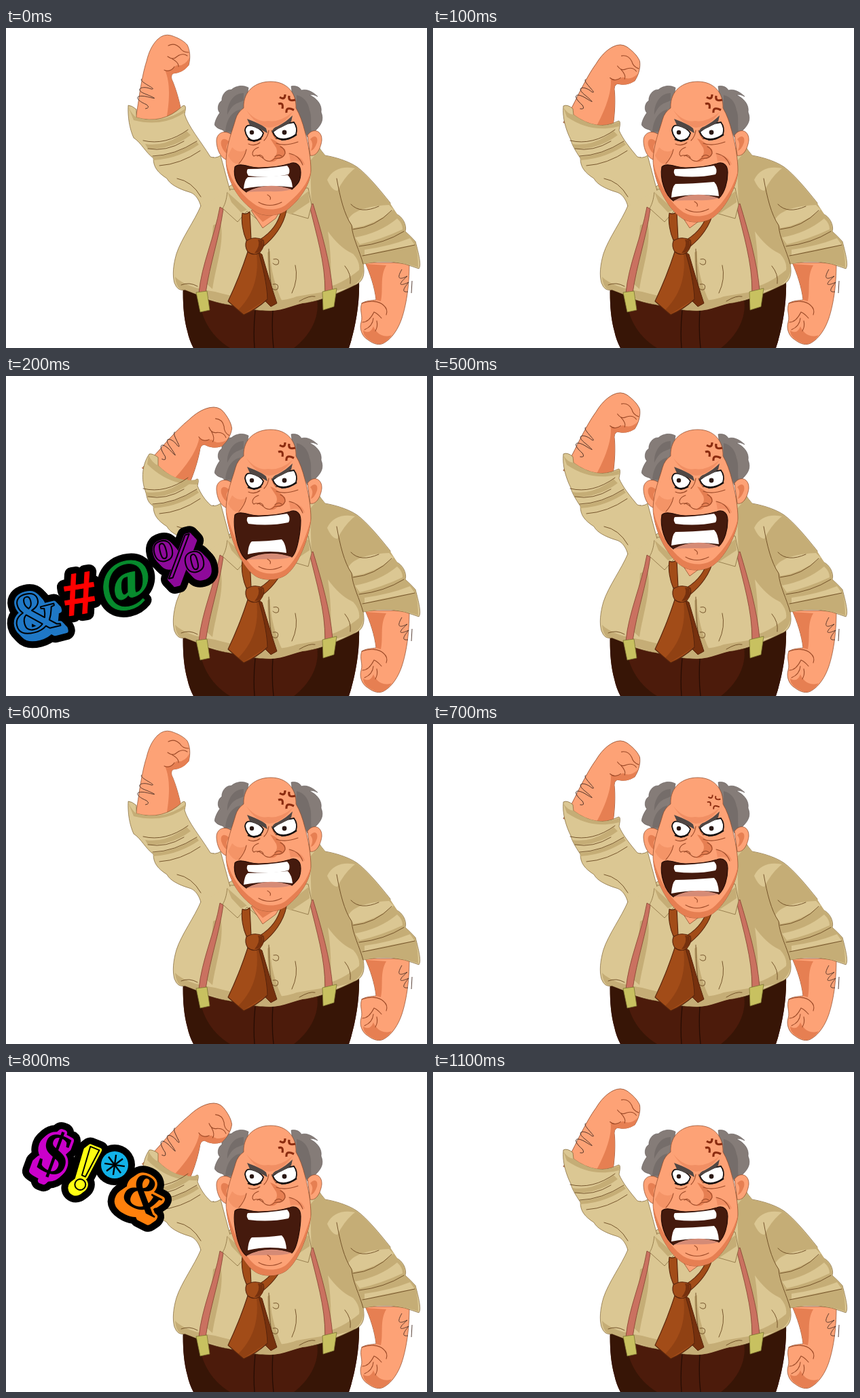
These frames come from a looping animation (620 by 472 pixels, 1.2 s). An HTML page:

```html
<!DOCTYPE html>
<html lang="en">
<head>
<meta charset="utf-8">
<title>Angry man</title>
<style>
  html, body { margin: 0; width: 100%; height: 100%; overflow: hidden; background: #fff; }
  svg { display: block; width: 100%; height: 100%; }
  .ln { fill: none; stroke: #6b4a22; stroke-width: .9; stroke-linecap: round; stroke-linejoin: round; }
  .skin { fill: #fda276; stroke: #8a4526; stroke-width: .7; }
  .tan { fill: #e67f52; }
  .crease { fill: none; stroke: #9c4a28; stroke-width: 1.1; stroke-linecap: round; }
  .fuzz { fill: none; stroke: #4a3026; stroke-width: .9; }
  .cloth { fill: #dbc793; stroke: #7d6234; stroke-width: .7; stroke-linejoin: round; }
  .lit { fill: #dbc793; }
  .fold { fill: #c5ad76; }
  .hair { fill: #857c78; stroke: #5d5552; stroke-width: .6; }
  .lock { fill: #6c6461; opacity: .6; }
  .tooth { fill: #fff; }
  .strap { fill: #ca7160; stroke: #83402f; stroke-width: .8; }
  .clip { fill: #c8c160; stroke: #7b7432; stroke-width: .8; }
  .tie { fill: #a24c18; stroke: #59250c; stroke-width: 1.1; stroke-linejoin: round; }
  .dark { fill: #76310e; }
</style>
</head>
<body>
<svg viewBox="0 0 620 472" preserveAspectRatio="none">
  <g id="trousers">
    <path fill="#4c1b0b" d="M261 374 C260 400 261 425 267 447 Q270 461 276 472 H505 C514 445 521 408 520 374Z"/>
    <path fill="#371506" d="M261 374 C260 400 261 425 267 447 Q270 461 276 472 H330 C298 452 286 424 283 390Z M458 400 C462 425 450 452 424 472 H505 C514 445 521 408 520 374Z"/>
    <path fill="none" stroke="#260d04" stroke-width="1.3" d="M367 416 Q364 446 366 472 M393 416 Q391 447 394 472"/>
  </g>

  <g id="lowArm">
    <path class="skin" d="M529 346 C536 362 543 382 545 401 C538 402 530 402 524 406 C520 417 526 424 523 434 C520 443 524 455 533 460 C542 467 550 468 556 465 C569 458 578 443 583 428 C589 410 594 382 594 346Z"/>
    <path class="tan" d="M530 348 C537 363 544 384 545 401 L552 403 C556 386 550 367 560 350Z"/>
    <path class="tan" d="M526 446 C526 456 535 461 544 465 C553 469 562 462 568 453 C555 458 545 450 541 440 C537 451 530 449 526 446Z"/>
    <path class="crease" d="M524 406 C535 402 549 402 556 409 Q563 415 560 423 M525 434 C533 434 538 427 542 419 Q547 421 553 428 M528 445 Q540 440 541 428 M544 447 Q548 440 546 432"/>
    <path class="fuzz" d="M583 356 C576 368 577 373 591 366 C577 378 578 382 593 375 C584 386 583 390 592 389 M598 373 L597 391"/>
  </g>

  <g id="shirt">
    <path class="cloth" d="M287 262 C278 284 258 311 251 333 C246 350 245 365 248 376 Q253 389 263 386 C274 390 287 395 299 401 Q318 407 329 408 C349 414 372 417 389 417 C407 416 425 406 443 405 C464 402 492 390 512 380 C526 375 529 364 526 348 Q567 338 608 355 C612 350 608 334 603 315 Q596 307 588 300 C591 290 583 278 576 275 C568 266 565 263 566 258 C550 238 532 216 517 205 C502 195 482 190 470 188 Q464 181 461 176 L430 180 L326 235 L305 190"/>
    <path class="fold" d="M448 196 L462 178 Q466 184 471 189 C488 191 503 197 517 206 C534 219 550 240 566 259 L577 276 Q589 285 588 300 L603 316 Q607 335 607 353 Q567 339 526 348 C528 364 523 375 505 383 L468 392 C471 355 463 318 450 270Z"/>
    <path class="lit" d="M473 224 C480 208 497 203 514 207 Q500 217 488 240 Q480 240 473 224Z M504 282 C512 268 538 262 564 261 L571 268 C552 283 533 292 512 295Z M514 309 Q551 302 576 281 Q584 288 584 297 Q552 312 521 319Z M528 327 Q565 322 595 310 L602 320 Q566 325 528 335Z M474 300 Q492 325 511 333 Q522 345 520 357 C505 369 492 377 478 381 Q480 340 474 300Z"/>
    <path class="fold" d="M249 367 C262 380 286 386 308 389 C352 401 394 409 428 396 L470 389 L480 394 L443 405 C425 407 410 417 389 417 C345 414 315 405 294 398 L264 386 Q251 388 249 367Z"/>
    <path class="fold" d="M305 291 C303 323 299 346 294 376 L304 385 C310 347 322 316 316 286Z M385 331 C385 358 387 382 400 406 L408 406 C397 384 389 355 389 329Z"/>
    <path class="ln" d="M487 222 C492 250 498 275 509 291 C510 309 521 329 526 348 M511 297 Q544 294 568 269 M520 322 Q557 318 586 300 M525 336 Q562 329 602 320 M508 260 Q522 275 549 263 M387 326 Q387 367 395 408 M426 350 Q431 370 421 391 M499 351 Q509 363 507 377 M258 379 Q270 374 282 381 M432 403 Q447 394 455 396"/>
    <path class="ln" d="M394 341 Q404 339 401 348 Q397 351 393 347 M393 378 Q403 376 400 385 Q396 388 392 384"/>
  </g>

  <g id="braces">
    <path class="strap" d="M315 264 L320 267 C314 310 300 348 294 391 L284 391 C288 348 307 309 315 264Z"/>
    <path class="strap" d="M447 262 L452 259 C464 299 478 347 481 388 L470 389 C470 345 457 305 447 262Z"/>
    <path class="clip" d="M280 390 L296 388 L300 416 L286 419Z M466 389 L487 384 L483 411 L467 416Z"/>
  </g>

  <g id="collar">
    <path class="cloth" d="M326 238 C326 248 323 260 319 266 L341 286 L355 270 L372 284 L407 270 L445 281 L450 261 L445 236Z"/>
    <path class="skin" d="M361 269 L378 295 L397 281 L407 265Z"/>
    <path class="tan" d="M362 269 L378 286 L403 270Z"/>
    <path class="fold" d="M326 242 L332 257 L346 272 L355 268Z M408 270 L446 240 L447 257 L420 275Z"/>
  </g>

  <g id="tie">
    <path class="tie" d="M348 273 Q354 276 359 271 L361 312 L354 313 C349 302 346 286 348 273Z M405 270 L413 269 C409 292 393 311 379 322 L374 312 C390 302 401 288 405 270Z"/>
    <path class="dark" stroke="#59250c" d="M371 330 L377 334 C384 358 391 382 399 406 L390 411 L381 402 C379 375 375 354 371 330Z"/>
    <path class="tie" d="M356 330 C347 358 337 382 327 403 Q339 414 350 423 Q369 415 385 400 C384 374 378 351 372 331Z"/>
    <path class="dark" d="M369 333 C372 360 368 390 342 416 L350 422 L384 400 C383 374 378 351 372 332Z" opacity=".4"/>
    <path class="tie" d="M354 314 Q366 306 379 313 Q382 321 374 331 Q365 337 356 330 Q351 322 354 314Z"/>
    <path class="dark" d="M371 312 Q375 321 366 332 Q375 332 379 322 L378 313Z"/>
  </g>

  <g id="hair">
    <path class="hair" d="M357 88 C348 83 337 86 332 91 C323 90 317 101 318 107 C311 111 311 122 315 125 C309 133 306 143 308 144 C313 151 320 148 322 154 L337 157 C345 136 350 126 353 114Z"/>
    <path class="hair" d="M420 86 C430 84 434 90 435 92 C443 89 453 95 459 101 Q452 97 447 99 C457 103 466 113 464 124 C469 136 463 144 457 150 L444 161 C438 151 431 130 424 116Z"/>
    <path class="lock" d="M350 96 C333 96 325 114 326 128 C334 111 339 112 350 107Z M345 120 C330 124 324 139 323 153 L336 153Z M428 99 C438 101 445 109 447 121 C451 130 448 143 450 154 L443 158 L428 122Z"/>
  </g>

  <g id="ears">
    <path class="skin" d="M333 158 C323 149 309 154 310 168 C311 184 320 197 330 194Z"/>
    <path class="skin" d="M444 158 C453 146 466 152 465 166 C463 180 456 190 448 188Z"/>
    <path class="tan" d="M329 168 C321 160 315 164 317 173 Q320 183 328 187 Q321 174 329 168Z M448 164 C455 156 460 161 458 169 Q454 180 449 181 Q454 170 448 164Z"/>
  </g>

  <g id="jaw"></g>

  <g id="face">
    <path class="tan" d="M389 163 C399 166 405 174 411 179 C414 187 408 193 400 193 Q394 199 387 197 C397 191 401 185 398 177Z"/>
    <path class="tan" d="M333 176 C342 185 349 182 354 180 C348 190 350 196 343 201 Q333 201 327 188Z" opacity=".4"/>
    <path class="tan" d="M417 186 C428 187 438 192 440 202 Q429 193 419 197Z M354 121 Q369 140 386 137 Q403 140 422 124 Q408 145 387 147 Q367 143 354 121Z" opacity=".5"/>
    <path class="crease" d="M372 176 C363 179 361 186 365 189 C371 185 377 191 382 195 Q390 199 396 192 Q407 194 411 185 Q411 178 404 175 M370 189 Q375 185 379 191 M396 190 Q401 185 406 189 M354 179 Q352 190 343 200 M417 185 Q432 188 437 202 M357 171 Q366 175 374 169 M398 170 Q411 175 430 168 M387 151 Q386 160 380 166 M391 151 Q393 158 398 164"/>
    <g fill="#fff" stroke="#151010" stroke-width="1.8">
      <path d="M352 151 Q353 142 361 144 Q374 147 379 155 Q377 165 365 167 Q354 164 352 151Z"/>
      <path d="M393 153 Q407 141 424 139 Q430 147 427 157 Q418 165 406 165 Q396 162 393 153Z"/>
      <path fill="none" stroke-width="2.4" d="M356 164 Q366 169 376 163 M398 162 Q413 168 428 157"/>
    </g>
    <circle cx="362" cy="154" r="3.2" fill="#2a1712"/>
    <circle cx="410" cy="154" r="3.4" fill="#2a1712"/>
    <path fill="#504744" d="M355 134 C365 138 376 142 383 148 L385 155 C375 149 364 146 359 143Z M391 154 Q393 147 400 145 C409 140 416 135 422 129 L420 138 C412 145 400 148 391 154Z"/>
  </g>

  <path id="vein" fill="none" stroke="#8b2c10" d="M403 102 Q411 107 411 98 M417 100 Q415 109 426 106 M401 112 Q409 109 407 119 M413 125 Q412 115 424 121"/>
  <g id="arm"></g>
  <g id="words" text-anchor="middle"></g>
</svg>

<script>
const $ = id => document.getElementById(id);
const path = (cls, d) => `<path class="${cls}" d="${d}"/>`;

// chin: bottom of the face, lip: bottom of the mouth, teeth: left, right, top, bottom of the lower row
const poses = {
  up: {
    chin: 276, lip: 240, teeth: [350, 422, 219, 237], fist: "",
    sleeve: "M287 263 C284 252 278 244 270 242 C253 237 241 230 237 222 C223 213 217 205 217 192 C205 183 199 169 188 162 C182 149 179 131 180 114 Q185 114 192 120 L192 132 Q231 143 260 115 Q267 111 263 127 C268 145 287 167 301 190 Q309 193 316 188 L330 240",
    rim: "M180 116 Q186 128 192 132 Q231 143 264 119 L264 124 Q231 147 188 136Z"
  },
  mid: {
    chin: 286, lip: 253, teeth: [351, 421, 229, 250], fist: "translate(7 6) rotate(18 226 130)",
    sleeve: "M287 263 C284 252 278 244 270 242 C253 237 241 230 237 222 C223 213 217 205 217 192 C209 180 204 171 203 165 C196 151 190 132 192 115 Q198 112 206 119 L207 128 Q241 153 271 138 Q278 133 274 151 C279 163 290 177 301 190 Q309 193 316 188 L330 240",
    rim: "M192 117 Q198 127 207 128 Q241 153 275 138 L274 145 Q234 156 197 131Z"
  },
  down: {
    chin: 300, lip: 269, teeth: [356, 413, 243, 263], fist: "translate(15 13) rotate(33 226 130)",
    sleeve: "M287 263 C284 252 278 244 270 242 C253 237 241 230 237 222 C223 213 217 205 217 192 C206 185 208 176 205 169 C199 153 200 131 211 115 Q216 114 224 120 L224 132 Q249 158 278 154 Q286 147 282 162 C287 174 293 183 302 191 Q309 193 316 188 L330 240",
    rim: "M210 117 Q215 128 224 132 Q249 158 283 153 L282 160 Q240 162 208 130Z"
  }
};

const forearm =
  path("skin", "M188 146 C193 125 195 108 197 95 C200 77 203 61 207 49 C210 36 215 25 223 17 Q232 8 243 11 C252 14 261 18 267 25 C271 33 272 44 269 55 Q260 66 246 67 Q241 71 246 80 C253 98 258 117 262 146Z") +
  path("tan", "M234 62 C243 82 241 112 234 146 L262 146 C257 112 251 93 245 78 Q241 69 247 67 Q261 66 269 55 L270 44 Q263 57 251 55 Q242 64 234 62Z") +
  path("crease", "M239 26 Q248 21 256 29 Q260 36 269 36 M238 42 Q246 48 252 42 Q260 36 267 41 M244 45 Q255 51 254 57 M233 62 Q242 66 248 57") +
  path("fuzz", "M200 75 C194 79 225 91 214 90 C200 84 187 91 207 98 C226 106 219 104 206 101 C189 98 190 106 207 113 Q213 118 205 119");

const sleeveFolds =
  path("fold", "M205 171 Q235 176 266 152 L272 158 Q243 180 209 178Z M217 190 Q248 188 281 168 L284 172 Q253 193 217 195Z") +
  path("ln", "M202 166 Q235 174 268 150 M209 178 Q236 183 262 167 M216 189 Q248 188 281 167 M226 203 Q257 201 286 181 M252 222 Q274 226 287 249");

const armMarkup = p =>
  `<g transform="${p.fist}">${forearm}</g>` +
  path("cloth", p.sleeve) + path("fold", p.rim) + sleeveFolds;

function jawMarkup({ chin: k, lip: m, teeth: [l, r, t, b] }) {
  const edge = `449 210 C448 232 432 ${k - 22} 414 ${k - 8} C402 ${k + 2} 378 ${k + 3} 366 ${k - 6} C345 ${k - 20} 325 228 324 195`;
  return path("skin", `M350 118 C349 92 368 79 390 79 C414 79 428 96 427 118 C433 128 437 140 440 152 C446 173 449 195 ${edge} C325 170 334 150 338 135 Q341 124 350 118Z`) +
    path("tan", `M${edge} C329 226 350 ${k - 26} 369 ${k - 14} C384 ${k - 6} 401 ${k - 7} 412 ${k - 15} C430 ${k - 30} 444 232 449 210Z`) +
    `<path fill="#451a0d" stroke="#280d06" stroke-width="1.2" d="M337 205 C345 197 359 207 373 206 Q399 206 418 200 C429 196 434 204 434 213 C434 226 430 ${m - 10} 421 ${m - 2} C400 ${m - 10} 372 ${m - 9} 354 ${m + 2} C341 ${m - 7} 334 222 337 205Z"/>` +
    path("tooth", "M356 208 Q385 208 414 203 Q420 209 416 216 Q388 222 357 218 Q353 212 356 208Z") +
    path("tooth", `M${l} ${b} Q${l + 1} ${t + 5} ${l + 6} ${t + 1} Q${l + 29} ${t + 1} ${r - 7} ${t - 2} Q${r - 1} ${t + 4} ${r} ${b - 2} Q${(l + r) / 2} ${b - 7} ${l} ${b}Z`) +
    `<path fill="#d58b76" d="M354 ${m + 2} Q384 ${m - 14} 421 ${m - 2} Q404 ${m + 2} 390 ${m + 1} Q370 ${m + 1} 354 ${m + 2}Z"/>` +
    path("crease", `M372 ${k - 19} Q388 ${k - 10} 406 ${k - 19} M385 ${k - 30} Q391 ${k - 27} 389 ${k - 23}`);
}

const SERIF = "'Liberation Serif', serif", SANS = "'Liberation Sans', sans-serif";

// char, centre x, centre y, size, tilt, colour, baseline shift in em, depth, swell, face, font
const curses = [
  [
    ["&", 43, 348, 86, -14, "#1f78c6", .33, 10, 8, "line", SERIF],
    ["#", 108, 321, 88, -9, "#ff0000", .34, 0, 1, "", SANS],
    ["@", 177, 308, 83, -13, "#078a2d", .25, 0, 1, "", SERIF],
    ["%", 254, 266, 84, -14, "#8e0a9a", .33, 13, 5, "line", SERIF]
  ],
  [
    ["$", 72, 122, 88, 20, "#cb00cb", .32, -9, 9, "black", SERIF],
    ["!", 119, 142, 98, 22, "#ffff12", .33, -8, 7, "line", SERIF],
    ["*", 160, 137, 0, 0, "#12b2e8"],
    ["&", 205, 180, 76, 27, "#ff800c", .33, -11, 9, "black", SERIF]
  ]
];

function glyph([ch, x, y, size, tilt, color, shift, depth, swell, face, font], under) {
  if (!size) {
    if (under) return `<circle cx="${x}" cy="${y}" r="30"/>`;
    const spokes = [0, 45, 90, 135].map(a => `<path d="M-15 0H15" transform="rotate(${a + 8})"/>`).join("");
    return `<g transform="translate(${x} ${y})"><circle r="20" fill="${color}"/><g stroke="#000" stroke-width="2.4">${spokes}</g></g>`;
  }
  const text = (dx, dy, paint) => `<text x="${dx}" y="${size * shift + dy}" ${paint}>${ch.replace("&", "&amp;")}</text>`;
  const side = Math.sign(depth);
  let out = "";
  for (let i = Math.abs(depth); i >= 0; i -= 2)
    out += text(i * side * .5, i * .9, under
      ? `stroke="#000" stroke-width="${swell + 20}"`
      : `fill="${color}" stroke="${color}" stroke-width="${swell}"`);
  if (!under && face === "black") out += text(0, 0, 'fill="#000"');
  if (!under && face === "line") out += text(0, 0, `fill="${color}" stroke="#000" stroke-width="2"`);
  return `<g transform="translate(${x} ${y}) rotate(${tilt})" font-family="${font}" font-size="${size}" font-weight="700" stroke-linejoin="round">${out}</g>`;
}

const curseMarkup = list => list.map(g => glyph(g, true)).join("") + list.map(g => glyph(g, false)).join("");

const STEP = 100, LOOP = 1200;
const order = ["up", "mid", "down", "down", "down", "mid", "up", "mid", "down", "down", "down", "mid"];
const art = {};
for (const name in poses) art[name] = { arm: armMarkup(poses[name]), jaw: jawMarkup(poses[name]) };
const shouts = curses.map(curseMarkup);
let shown = -1;

function render(time) {
  const step = Math.floor((time % LOOP) / STEP);
  if (step === shown) return;
  shown = step;
  const name = order[step], small = step === 7;
  $("arm").innerHTML = art[name].arm;
  $("jaw").innerHTML = art[name].jaw;
  $("words").innerHTML = name === "down" ? shouts[step < 6 ? 0 : 1] : "";
  $("vein").setAttribute("stroke-width", small ? 2.4 : 3.2);
  $("vein").setAttribute("transform", small ? "translate(414 117) scale(.78) translate(-414 -114)" : "");
}

let start;
function tick(now) {
  start ??= now;
  render(now - start);
  requestAnimationFrame(tick);
}
render(0);
requestAnimationFrame(tick);
</script>
</body>
</html>
```
